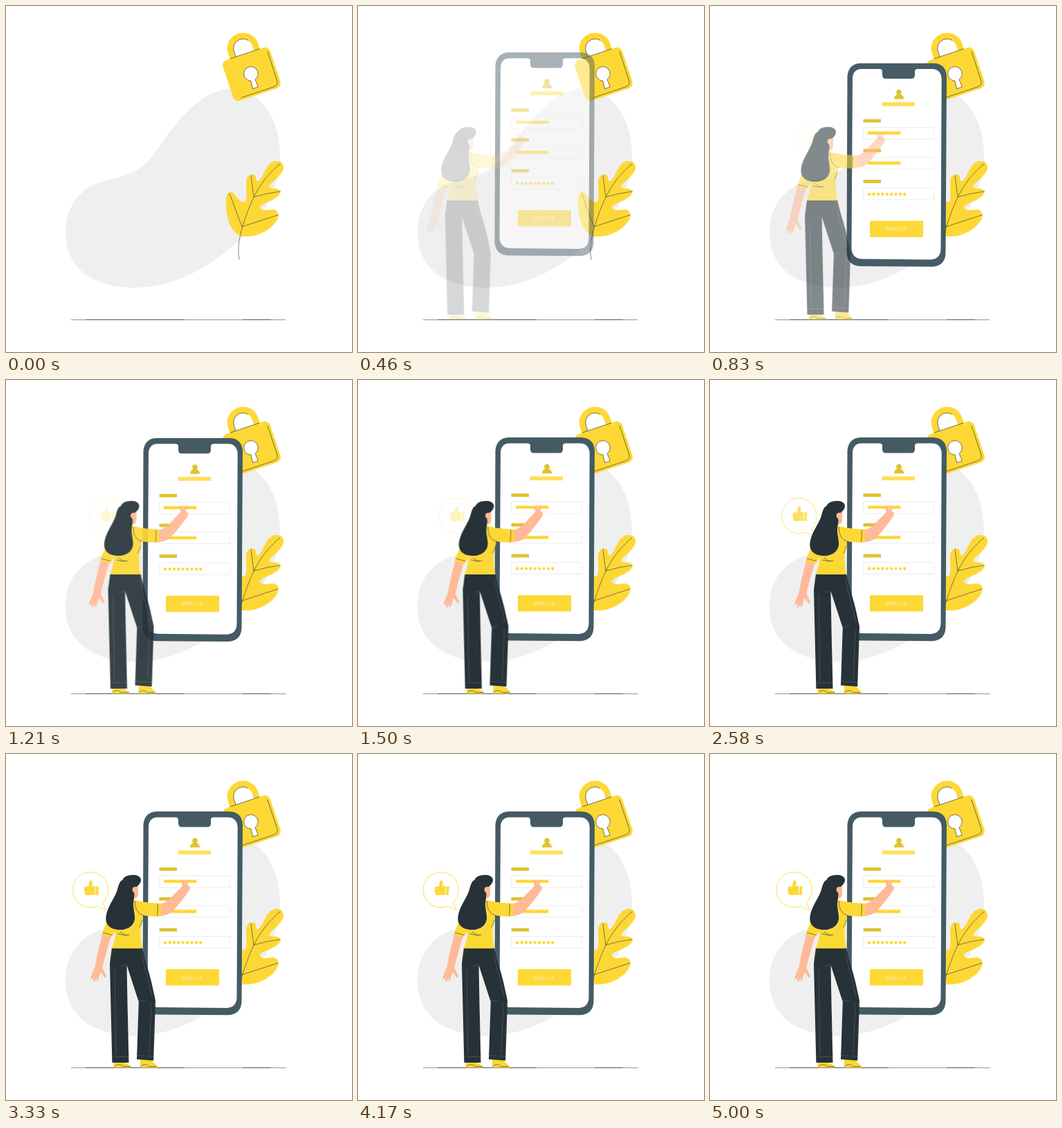
These frames come from a looping animation (500x500 px, 5.04 s). An HTML page:

```html
<!DOCTYPE html>
<html lang="en">
<head>
<meta charset="utf-8">
<title>Sign up</title>
<style>
  html, body { margin: 0; width: 100%; height: 100%; overflow: hidden; background: #fff; }
  svg { display: block; width: 100%; height: 100%; }

  .yellow { fill: #fdd835; }
  .dark { fill: #263238; }
  .skin { fill: #ffb997; }
  .label { fill: #e2c130; }
  .pale { fill: #ffdf5a; }
  .line { fill: none; stroke: #263238; stroke-width: .6; stroke-linecap: round; stroke-linejoin: round; }
  .seam { fill: none; stroke: #737d82; stroke-width: .4; }
  .field { fill: #fff; stroke: #e0e0e0; stroke-width: .6; }
  .caption { font: 8px "Liberation Serif", "Times New Roman", serif; fill: #fff; fill-opacity: .75; }

  /* Each part eases in over its own share of the 5040 ms loop. */
  .phone, .woman, .bubble { animation: 5040ms infinite; }
  .phone { animation-name: drop; }
  .woman { animation-name: walk; }
  .bubble { animation-name: float; }

  @keyframes drop {
    0% { opacity: 0; transform: translateY(-30px); animation-timing-function: cubic-bezier(.36, -.01, .5, 1.38); }
    24.8%, 100% { opacity: 1; transform: none; }
  }
  @keyframes walk {
    0% { opacity: 0; transform: translateX(-30px); animation-timing-function: cubic-bezier(.36, -.01, .5, 1.38); }
    39.68%, 100% { opacity: 1; transform: none; }
  }
  @keyframes float {
    0% { opacity: 0; transform: translateX(30px); animation-timing-function: cubic-bezier(.36, -.01, .5, 1.38); }
    99.2%, 100% { opacity: 1; transform: none; }
  }
</style>
</head>
<body>
<svg viewBox="0 0 500 500">
  <path fill="#efefef" d="M86 328C86 288 108 260 148 251C188 244 204 230 226 197C252 160 286 120 326 119C368 120 396 163 396 216C396 268 365 315 330 345C290 380 240 407 187 407C125 407 86 378 86 328Z"/>

  <g class="floor" fill="none" stroke="#263238">
    <path stroke-width=".5" d="M94 453.5H404"/>
    <path stroke-width=".6" d="M115 453.2H258M342 453.2H383"/>
  </g>

  <g class="lock" transform="translate(355 98.5) rotate(-18.5)">
    <path fill="#fff" stroke="#fdd835" stroke-width="9" d="M-18.3 -27V-39a18.3 18.3 0 0 1 36.6 0V-27"/>
    <path class="line" d="M-13.8 -31V-39a13.8 13.8 0 0 1 24 -9.5"/>
    <rect class="yellow" x="-36" y="-31" width="72" height="62" rx="8"/>
    <path class="line" d="M-22 -31H22M32 -23.5V20q0 7 -7 7.5H-25"/>
    <path fill="#fff" class="hole" stroke="#263238" stroke-width=".6" d="M-4 8.8A10.2 10.2 0 1 1 2.4 8.8L3 20.5H-5.2Z"/>
  </g>

  <g class="leaf">
    <path class="yellow" d="M344 333C328 332 318 312 318 284C317 271 323 266 328 270C334 278 340 285 345 283C349 280 347 268 347 255C347 244 356 240 361 246C361 252 363 255 366 252C374 244 376 224 391 224C400 224 403 232 400 238C395 248 384 254 380 261C383 266 394 261 397 268C395 280 373 283 367 290C368 298 377 294 386 294C396 296 395 305 390 312C380 326 360 334 344 333Z"/>
    <path class="line" d="M396 228C372 248 360 270 352 290C340 320 333 345 337 366M354 245Q356 260 358 276Q378 270 396 268M323 271L341 319L393 302"/>
  </g>

  <g class="phone">
    <path fill="#455a64" d="M218 83H323Q341 84 342 102L340.5 358C340 371 332 377.3 320 377.3L217 376.5C205 376 197.5 369 197.5 356L198.5 102Q200 84 218 83Z"/>
    <path fill="#fff" d="M219 91.5H245Q249 91.5 249 95V100Q249 105.5 254 105.5H291Q296 105.5 296 100V95Q296 91.5 300 91.5H321Q334 92 334.7 106L333.5 352Q333 366 319 367L219 366Q205 365 204.5 350L206 106Q206 92 219 91.5Z"/>
    <g class="label">
      <circle cx="273" cy="125.3" r="3.8"/>
      <path d="M266.2 135C266.2 130.5 269 128 273 128S280 130.5 280 135Z"/>
      <rect x="221.5" y="164" width="25.5" height="4.8"/>
      <rect x="221.5" y="207" width="25.5" height="4.8"/>
      <rect x="221.5" y="251.6" width="25.5" height="4.8"/>
    </g>
    <rect class="pale" x="248.7" y="139.3" width="47.5" height="5.8"/>
    <g class="field">
      <rect x="221.5" y="176" width="102.5" height="17" rx="1"/>
      <rect x="221.5" y="219" width="102.5" height="17" rx="1"/>
      <rect x="221.5" y="263.5" width="102.5" height="17" rx="1"/>
    </g>
    <path class="yellow" d="M228 181.7h47.5v4.4H228ZM228 225.3h47.5v4.4H228Z"/>
    <path fill="none" stroke="#fdd835" stroke-width="4.4" stroke-linecap="round" stroke-dasharray="0 6.4" d="M230.2 272.5h51.5"/>
    <rect class="yellow" x="231" y="311" width="77" height="23.5" rx="1"/>
    <text class="caption" x="268.5" y="325.7" text-anchor="middle">SING UP</text>
  </g>

  <g class="bubble">
    <path fill="#fff" stroke="#fdd835" stroke-width=".9" d="M131.5 219.8A25.5 25.5 0 1 1 139.5 214.5L144 226Z"/>
    <path class="yellow" d="M113.5 191.5H118.5C120 189 119.5 185 121 183C123.5 182 125 184 124.5 187L124 191H128.3V203.5L115 204C112.5 201 112 194 113.5 191.5ZM129.6 191.5L133.6 191L132.8 203.8H129Z"/>
  </g>

  <g class="woman">
    <path class="skin" d="M139 261C135 278 131 292 129 305C128 312 123 318 122.5 324Q123.5 326.5 125.5 324L127 321L125.8 328Q127.5 330 129 327L130.8 322L130.4 327.5Q132.5 329 133.5 325L136.5 315Q140 319 143 323Q146 323 144 319L139.5 309C142 296 147 280 151.5 264Z"/>
    <path class="skin" d="M223 217C230 215 236 211 241 205L255 190.5L252.5 183.5Q254 180.5 255.7 183L259 187.5L262.5 181.5Q264.7 180.5 264.2 183.5L262 189Q267 191 265.5 196C258 207 247 221 239 229Q232 234 222 234Z"/>

    <path class="yellow" d="M156 446H172L181 451.2Q182 453.3 179.5 453.3H155.5ZM194 442H210L218.5 450.8Q220 453.3 217 453.3H193.5Z"/>
    <path class="line" d="M157 451Q163 446 169 451.5H180M195 451Q201 446 207 451.5H217"/>

    <path class="dark" d="M153 280H197C200 296 206 312 210 329L216 356L213.2 443L189 441.3L191.8 358L174.5 305L175.5 360L177.5 446H153.4L150 303Z"/>
    <path class="seam" d="M196 288C200 310 207 332 211 350M191.8 358L201 356M166 306Q171 308 174 304M154 437.5H177M190 435.5L213 437M157 310L159 436M210 360L207 434"/>

    <path class="yellow" d="M186 211C197 214 211 215.5 224.5 215.8L223.5 234.5C214 235 206 234.5 198 233C198 242 194 249 194.5 260Q195 271 197 281H153C156 272 158 266 158.5 256L152.8 265L138.5 261.5C141 253 145 244 150 235L166 214Z"/>
    <path class="line" d="M186.5 213C186 223 190 231 199 233.5M219.5 217L218.7 234M140 258L153 261.5M162 260Q170 263 178 261.5M165 257Q169 261 174 262M197 240Q195.5 246 193 250"/>

    <path class="skin" d="M180 191H191.3L190.8 204Q190 209.5 184.5 208.5L185 213H177Z"/>
    <path class="dark" d="M195 181.5C194 176 187 174.3 181 175C175 175 170 178 168.5 182C163 184 162.5 192 160 199C156 209 148 219 145 232C142 245 149 254 165 254C178 254 187 246 186 235C185.5 226 183 222 184.5 211C186 204 186 200 183.5 199C181 195 184 191 188 192C192 190 195 186 195 181.5Z"/>
  </g>
</svg>
</body>
</html>
```
